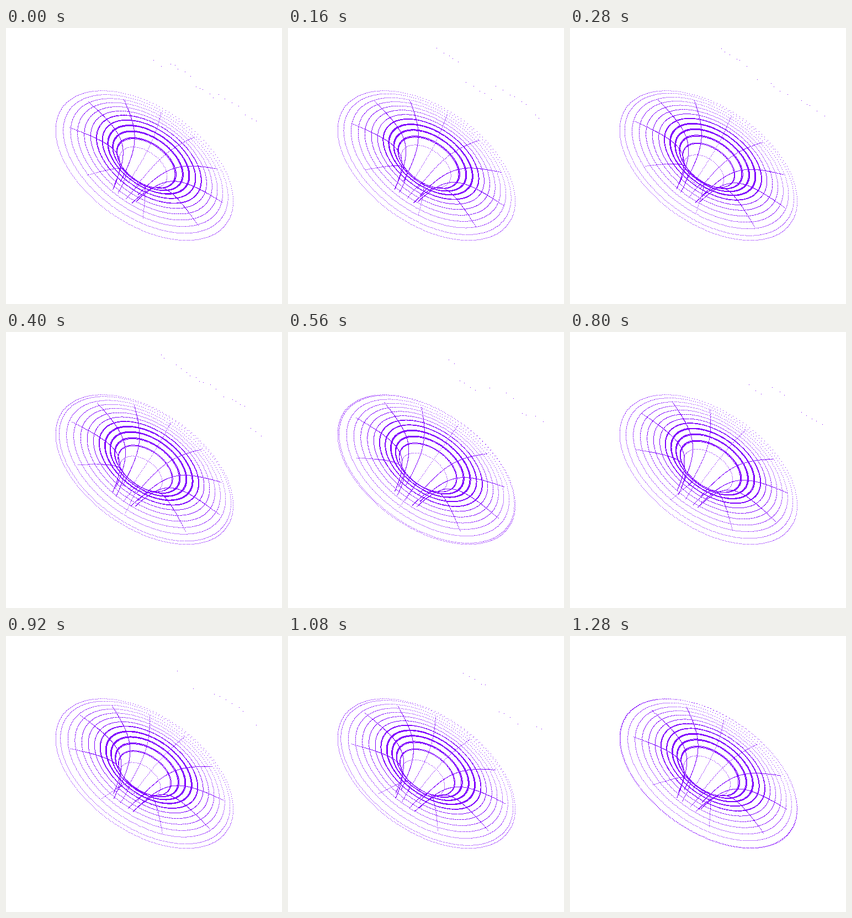
Animation of 500 by 500 pixels, one loop 1320 ms. Source, as an HTML page with a canvas:

```html
<!DOCTYPE html>
<html lang="en">
<head>
<meta charset="utf-8">
<title>Wormhole</title>
<style>
  html, body { margin: 0; width: 100%; height: 100%; overflow: hidden; background: #fff; }
  canvas { display: block; }
</style>
</head>
<body>
<canvas id="stage" width="500" height="500"></canvas>
<script>
const ctx = document.getElementById('stage').getContext('2d');
const LOOP = 1320, SLOT = 40, STEPS = 29;
const RIM = 172.7, THROAT = 42, RING_GAP = 11.1, SPOKES = 10;
const DIST = 457, SIN = 0.549, COS = 0.836;       // camera distance and pitch
const ORIGIN = [269.5, 221.5], ROLL = [0.819, 0.574];
const STEM_END = 102, FLARE = 105000, TILT = 0.05;

const depth = r => TILT * (RIM - r) + FLARE * (r ** -2 - RIM ** -2);
const slope = r => TILT + 2 * FLARE / r ** 3;

function dot(x, y) {
  ctx.fillRect(Math.round(x), Math.round(y), 1, 1);
}

// Perspective view of the funnel point at radius r and angle a.
function project(r, a) {
  const y = r * Math.sin(a), h = depth(r);
  const w = 1 - (y * COS - h * SIN) / DIST;
  const u = r * Math.cos(a) / w, v = (y * SIN + h * COS) / w;
  return {
    x: ORIGIN[0] + u * ROLL[0] - v * ROLL[1],
    y: ORIGIN[1] + u * ROLL[1] + v * ROLL[0],
    v, w
  };
}

function ring(r, density = 1) {
  const outer = Math.max(0, (r - 95) / 77);
  const gap = r < 53 ? 3 : (0.9 + 2 * outer) / density;
  for (let a = -Math.PI; a < Math.PI;) {
    const p = project(r, a);
    dot(p.x, p.y);
    const far = Math.max(0, 0.3 * Math.cos(a) - Math.sin(a));
    a += gap * (1 + 1.5 * far * outer) * p.w / r;
  }
}

function spoke(a) {
  const edgeOn = Math.sin(a) ** 8;
  for (let r = 152; r > 29;) {
    const p = project(r, a);
    if (r < 60 && p.v > STEM_END) break;
    dot(p.x, p.y);
    const gap = 0.6 + 2.4 * edgeOn + Math.max(0, (r - 110) / 40);
    r -= gap * p.w / Math.hypot(1, slope(r));
  }
}

function random(seed) {
  return () => {
    seed = (seed * 16807) % 2147483647;
    return seed / 2147483647;
  };
}

// Loose specks above the far edge, in short broken runs.
function specks(n) {
  if (n === STEPS - 1) return;
  const rnd = random(7919 * (n + 3));
  const late = n >= 25, end = late ? 408 : 464;
  let shift = 0;
  for (let x = late ? 345 : 262 + 2.4 * n; x < end; x += 5 + rnd() * 9) {
    if (rnd() < 0.25) {
      shift = rnd() * 36 - 8;
      x += rnd() * (6 + n * 1.3);
    }
    if (x < end) dot(x, 23 + (x - 254) * 0.65 + shift + rnd() * 4);
  }
}

function draw(n) {
  ctx.fillStyle = '#fff';
  ctx.fillRect(0, 0, 500, 500);
  ctx.fillStyle = '#8000ff';

  ring(RIM);
  const phase = (2 * n / STEPS) % 1;
  for (let r = RIM - RING_GAP * (1 - phase); r > THROAT; r -= RING_GAP) {
    ring(r);
    if (r > 54 && r < 108) ring(r + 1, 0.8);
    if (r > 60 && r < 92) ring(r - 1, 0.7);
  }

  const turn = 2 * Math.PI / SPOKES;
  for (let i = 0; i < SPOKES; i++) spoke(0.06 + turn * (i + n / STEPS));
  specks(n);
}

// 29 poses over 33 slots: every ninth slot or so repeats its pose.
function poseAt(time) {
  const slot = Math.floor((time % LOOP) / SLOT);
  return slot - Math.floor((slot + 3) / 9) - (slot > 0 ? 1 : 0);
}

let shown = -1;
const start = performance.now();
function tick() {
  const n = poseAt(performance.now() - start);
  if (n !== shown) draw(shown = n);
  requestAnimationFrame(tick);
}
tick();
</script>
</body>
</html>
```
